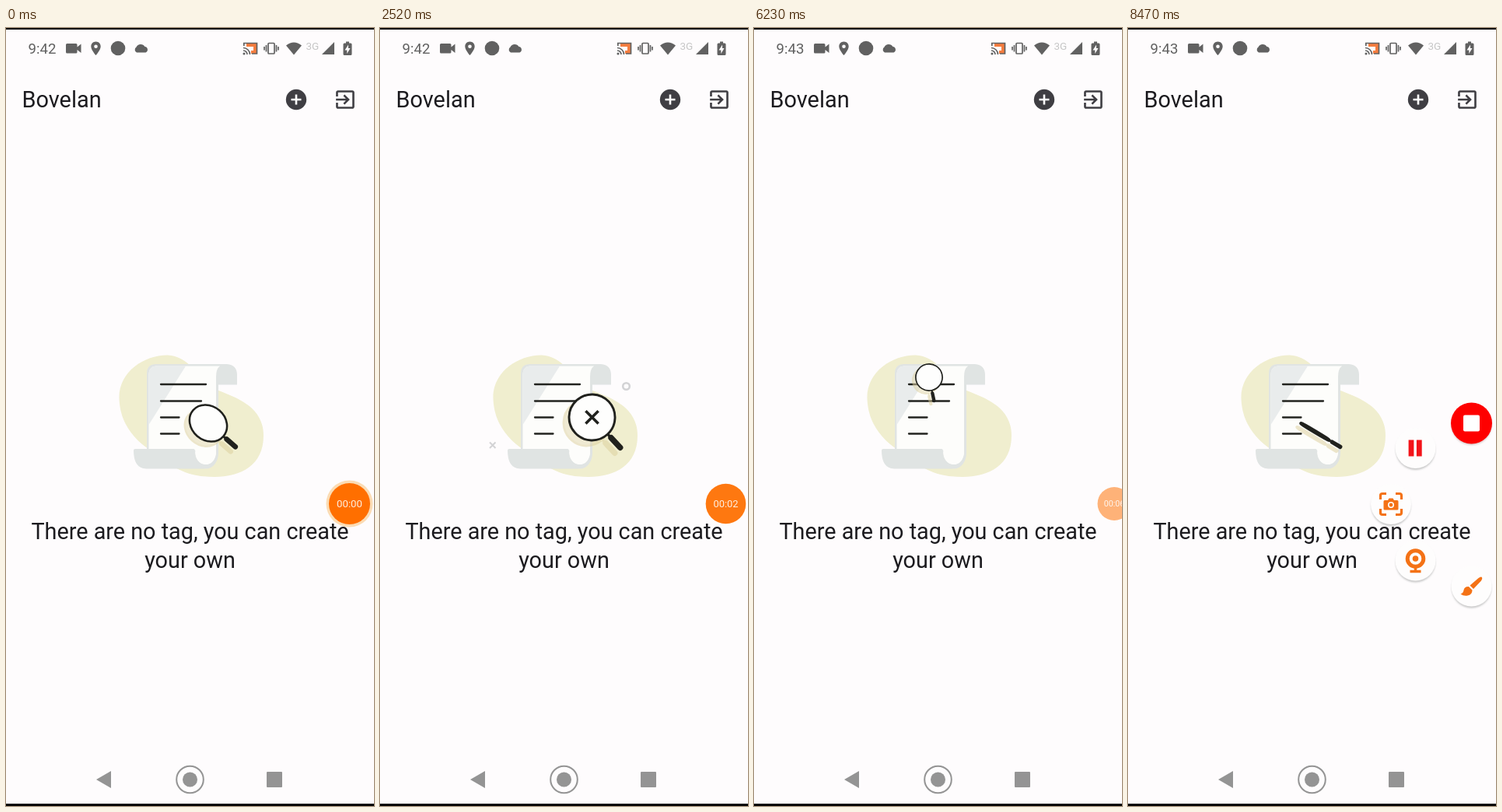
These frames come from a looping animation (473x1000 px, 8540 ms). An HTML page:

```html
<!DOCTYPE html>
<html lang="en">
<head>
<meta charset="utf-8">
<title>Empty tag list</title>
<style>
html, body { margin: 0; width: 100%; height: 100%; overflow: hidden; background: #fefcfd; }
svg { display: block; width: 100%; height: 100%; font-family: Roboto, "Noto Sans", sans-serif; }
</style>
</head>
<body>
<svg viewBox="0 0 473 1000">
  <defs>
    <clipPath id="sheetClip"><rect id="sheetRect" x="160" y="425" width="150" height="150"/></clipPath>
    <filter id="soft" x="-20%" y="-20%" width="140%" height="140%"><feGaussianBlur stdDeviation="1.3"/></filter>
    <g id="disc">
      <circle cy="2.5" r="25.5" fill="#c8c8c8" filter="url(#soft)"/>
      <circle r="26" fill="#fefdfd"/>
    </g>
  </defs>
  <rect width="473" height="1000" fill="#fefcfd"/>
  <rect width="473" height="2"/>
  <rect y="997" width="473" height="3"/>

  <!-- status bar -->
  <g fill="#616161">
    <text id="clock" x="28.5" y="33" font-size="18.6">9:42</text>
    <path d="M78.500 20H90Q91.500 20 91.500 21.500V24.500L96.500 20.500V32L91.500 28V31Q91.500 32.500 90 32.500H78.500Q77 32.500 77 31V21.500Q77 20 78.500 20Z"/>
    <path fill-rule="evenodd" d="M115.500 17.500C111.800 17.500 109.300 20.300 109.300 23.700C109.300 28.300 115.500 35 115.500 35S121.700 28.300 121.700 23.700C121.700 20.300 119.200 17.500 115.500 17.500ZM115.500 21.400A2.300 2.300 0 1 1 115.500 26A2.300 2.300 0 1 1 115.500 21.400Z"/>
    <circle cx="144" cy="26" r="9.300"/>
    <path d="M168 31.500A4 4 0 0 1 167.500 24.500A6.300 6.300 0 0 1 178.500 24A3.900 3.900 0 0 1 179.500 31.500Z"/>
    <path d="M360 22.500Q370 14.500 380 22.500L370 34.500Z"/>
    <path d="M422 18V34H406Z"/>
    <path fill-rule="evenodd" d="M437 17.500H441V19.500H443Q444.500 19.500 444.500 21V33.500Q444.500 35 443 35H435Q433.500 35 433.500 33.500V21Q433.500 19.500 435 19.500H437ZM440 21.500L435.500 28.500H438.300V33L442.500 26H440Z"/>
    <text x="385.500" y="27.500" font-size="13.500" fill="#c6c6c6">3G</text>
  </g>
  <g fill="none" stroke="#616161" stroke-width="1.700">
    <rect x="337" y="19.500" width="8" height="13.500" rx="1"/>
    <path d="M334.500 22V30.500M347.500 22V30.500M332 24V28.500M350 24V28.500"/>
    <path d="M309 22H320V31H315" stroke="#f47d3f" stroke-width="4"/>
    <path d="M305.800 23V19.500H322.500V33H316"/>
    <path d="M305 25.500A8.500 8.500 0 0 1 313.500 34M305 29A5 5 0 0 1 310 34"/>
    <circle cx="306" cy="33" r=".7"/>
  </g>

  <!-- app bar -->
  <text x="20.500" y="102" font-size="28.900" fill="#1c1b1f">Bovelan</text>
  <circle cx="373" cy="92" r="13.200" fill="#3f3e43"/>
  <path d="M373 85.500V98.500M366.500 92H379.500" stroke="#fff" stroke-width="2.600"/>
  <path transform="translate(420.200 76.200) scale(1.314)" fill="#3f3e43" d="M10.090 15.590L11.500 17l5-5-5-5-1.410 1.410L12.670 11H3v2h9.670zM19 3H5c-1.110 0-2 .9-2 2v4h2V5h14v14H5v-4H3v4c0 1.100.89 2 2 2h14c1.100 0 2-.9 2-2V5c0-1.100-.9-2-2-2z"/>

  <!-- illustration -->
  <path id="blob" fill="#f0eecf" d="M145.500 477C144 442 178 420 208 420.500C238 422 250 455 268 464C296 475 331 486 331 524C331 562 302 577 268 577C228 577 212 562 194 548C166 532 147 510 145.500 477Z"/>
  <g clip-path="url(#sheetClip)">
    <path d="M193 432H284Q297 433 297 446V458.500H273V546A16 20 0 0 1 257 566.500Q243 565 243 548H181V444Q181 432 193 432Z" fill="#e0e4e3"/>
    <path d="M194 434.500H275Q270 438 270 448V546Q268 561 256.500 561Q244 560 243 542V547.500H183.500V446Q183.500 434.500 194 434.500Z" fill="#fdfdfb"/>
    <path d="M270 545A13.500 16 0 0 1 243 545Z" fill="#fdfdfb"/>
    <path d="M194 434.500H231L183.500 510V446Q183.500 434.500 194 434.500Z" fill="#e9ecec"/>
  </g>
  <path id="roll" fill="#e0e4e3" d="M166 541H241Q243 541 243 544C243 557 248 565 257 566.500H180Q164 566 164 543Q164 541 166 541Z"/>
  <g id="lines" stroke="#22231f" stroke-width="2.300" stroke-linecap="round"></g>
  <g id="decor" fill="none" stroke="#d3d3d5" stroke-width="2">
    <path d="M141 532.500L148.500 540M148.500 532.500L141 540"/>
    <circle cx="316.500" cy="460.500" r="4.300" stroke-width="2.600"/>
  </g>
  <g id="shade" opacity=".5" stroke="#dccf9b" fill="#e3d8ac"></g>
  <g id="glass" stroke="#20211d" fill="#fefefd"></g>
  <path id="cross" stroke="#20211d" stroke-width="3.500" fill="none"/>

  <g font-size="28.800" fill="#1c1b1f" text-anchor="middle">
    <text x="236.500" y="657">There are no tag, you can create</text>
    <text x="236.500" y="694">your own</text>
  </g>

  <!-- recorder -->
  <g id="bubble">
    <circle id="glow" r="30" fill="#fbdcb4"/>
    <circle r="26.500" fill="#ff6f00"/>
    <text id="timer" y="4.700" font-size="13.200" fill="#ffeede" text-anchor="middle">00:00</text>
  </g>
  <g id="menu">
    <g>
      <circle cy="2" r="26" fill="#d8c8c8" filter="url(#soft)"/>
      <circle r="26.500" fill="#fe0000"/>
      <rect x="-10.500" y="-10.500" width="21" height="21" rx="2" fill="#fff"/>
    </g>
    <g>
      <use href="#disc"/>
      <path d="M-5.500 -10.500V10.500M4.800 -10.500V10.500" stroke="#f3141a" stroke-width="6.800"/>
    </g>
    <g>
      <use href="#disc"/>
      <path d="M-13.500 -6V-11Q-13.500 -13.500 -11 -13.500H-6M6 -13.500H11Q13.500 -13.500 13.500 -11V-6M13.500 6V11Q13.500 13.500 11 13.500H6M-6 13.500H-11Q-13.500 13.500 -13.500 11V6" fill="none" stroke="#f47216" stroke-width="3.200"/>
      <path d="M-8 -5H-4L-2.500 -7.500H2.500L4 -5H8Q9.500 -5 9.500 -3.500V6Q9.500 7.500 8 7.500H-8Q-9.500 7.500 -9.500 6V-3.500Q-9.500 -5 -8 -5Z" fill="#f47216"/>
      <circle cy="1" r="3.200" fill="#f47216" stroke="#fff" stroke-width="1.600"/>
    </g>
    <g>
      <use href="#disc"/>
      <g fill="none" stroke="#f47216">
        <circle cy="-2.500" r="10.300" stroke-width="5"/>
        <path d="M0 9V13M-7 14H7" stroke-width="3.500"/>
      </g>
      <circle cy="-2.500" r="3.800" fill="#f47216"/>
    </g>
    <g>
      <use href="#disc"/>
      <path d="M13.500 -11.500Q14.500 -9 12.500 -7L2.500 3.500L-2 -1L9 -10.500Q12 -13 13.500 -11.500ZM-3.500 .500L1 5Q1 11 -5 12Q-10 13 -14 10Q-10.500 9 -10 5Q-9 0 -3.500 .500Z" fill="#f47216"/>
    </g>
  </g>

  <!-- navigation -->
  <g fill="#949494">
    <path d="M116 966L135 955V977Z"/>
    <circle cx="236.500" cy="966" r="9.500"/>
    <circle cx="236.500" cy="966" r="17.300" fill="none" stroke="#949494" stroke-width="2"/>
    <rect x="335" y="956" width="20" height="20" rx="1"/>
  </g>
</svg>
<script>
const LOOP = 8540, STEP = 70, RESTART = 4410;
const $ = id => document.getElementById(id);
const set = (el, attrs) => { for (const k in attrs) el.setAttribute(k, attrs[k]); };
const ramp = (t, a, b) => Math.min(1, Math.max(0, (t - a) / (b - a)));
const ease = p => p * p * (3 - 2 * p);
const mix = (a, b, p) => a + (b - a) * p;

// keys: [time, ...values]
function track(t, keys) {
  let i = 0;
  while (i < keys.length - 2 && t >= keys[i + 1][0]) i++;
  const [a, b] = [keys[i], keys[i + 1]];
  const p = ease(ramp(t, a[0], b[0]));
  return a.slice(1).map((v, n) => mix(v, b[n + 1], p));
}

// x, y, scale, angle, squash
const searching = [
  [0, 260, 508, .87, 41, .85], [420, 273, 500, 1, 47, 1],
  [1470, 273, 500, 1, 47, 1], [3640, 272, 501, 1, 47, 1]
];
const entering = [
  [5700, 225, 449, 0, 95, 1], [6000, 225, 449, .58, 84, 1],
  [6230, 225, 449, .58, 78, 1], [7210, 224, 449, .58, 66, 1],
  [8470, 240.5, 519, .71, 31, .03], [8540, 243, 518, .74, 33, .15]
];
const crossKeys = [[1260, 0], [1470, 5], [1750, 8.2], [3640, 8]];

// x end, y, start and end of drawing
const rules = [
  [257, 458, 4900, 5130], [251, 479.5, 5080, 5300],
  [222.5, 500.5, 5240, 5420], [222.5, 521.5, 5360, 5540]
];
const spots = [[441.5, 508], [369.5, 540], [338, 612], [369.5, 684.5], [441.5, 717.5]];

const glassShape = '<path stroke-linecap="round" stroke-width="3.5" d="M30 0H36"/>' +
  '<path stroke-linecap="round" stroke-width="7.5" d="M36 0H53"/><ellipse rx="29.5"/>';
$('glass').innerHTML = $('shade').innerHTML = glassShape;
$('lines').innerHTML = '<path/>'.repeat(rules.length);

function drawGlass(t) {
  const [x, y, s, a, q] = track(t, t < RESTART ? searching : entering);
  const shown = (t < RESTART || t > 5700) ? 'visible' : 'hidden';
  for (const [id, off] of [['glass', 0], ['shade', 7]]) {
    const el = $(id);
    set(el, { visibility: shown,
      transform: `translate(${x - off * s} ${y + off * s}) rotate(${a}) scale(${s})` });
    set(el.lastChild, { ry: 29.5 * q, 'stroke-width': 2.9 + 4 * (1 - q) ** 3 });
  }
  const h = t < RESTART ? track(t, crossKeys)[0] : 0;
  set($('cross'), { visibility: h ? 'visible' : 'hidden',
    d: `M${x - h} ${y - h}L${x + h} ${y + h}M${x + h} ${y - h}L${x - h} ${y + h}` });
}

function drawPage(t) {
  const fresh = t >= RESTART;
  const fade = fresh ? ramp(t, RESTART, 5700) : 1;
  set($('blob'), { opacity: fade, transform: `translate(${2 * (1 - fade)} 0)` });
  set($('sheetRect'), { height: !fresh ? 150 : t < 5110 ? 123 * ease(ramp(t, 4480, 4970)) : 150 });
  set($('roll'), { opacity: fresh ? ramp(t, 5040, 5250) : 1 });
  rules.forEach(([end, y, from, to], i) => {
    const p = fresh ? ramp(t, from, to) : 1;
    set($('lines').children[i], { d: p ? `M199 ${y}H${mix(199, end, p)}` : '' });
  });
  set($('decor'), { opacity: fresh ? 0 : ramp(t, 1900, 2400) });
}

function drawRecorder(t) {
  const dock = ease(ramp(t, 2450, 2750)) * (1 - ease(ramp(t, 6580, 6790)));
  const open = ease(ramp(t, 6790, 7070));
  set($('bubble'), { opacity: mix(1, .52, dock), visibility: open ? 'hidden' : 'visible',
    transform: `translate(${mix(441.5, 463, dock)} 611.5) scale(${mix(1, .81, dock)})` });
  set($('glow'), { opacity: 1 - ramp(t, 70, 420) });
  const sec = Math.max(0, Math.floor((t - 60) / 1000));
  $('timer').textContent = '00:0' + sec;
  $('clock').textContent = t < 5600 ? '9:42' : '9:43';
  set($('menu'), { visibility: open ? 'visible' : 'hidden' });
  spots.forEach(([x, y], i) => set($('menu').children[i], {
    transform: `translate(${mix(441.5, x, open)} ${mix(612, y, open)}) scale(${mix(.4, 1, open)})` }));
}

const start = performance.now();
function frame() {
  const t = Math.floor((performance.now() - start) % LOOP / STEP) * STEP;
  drawPage(t);
  drawGlass(t);
  drawRecorder(t);
  requestAnimationFrame(frame);
}
frame();
</script>
</body>
</html>
```
